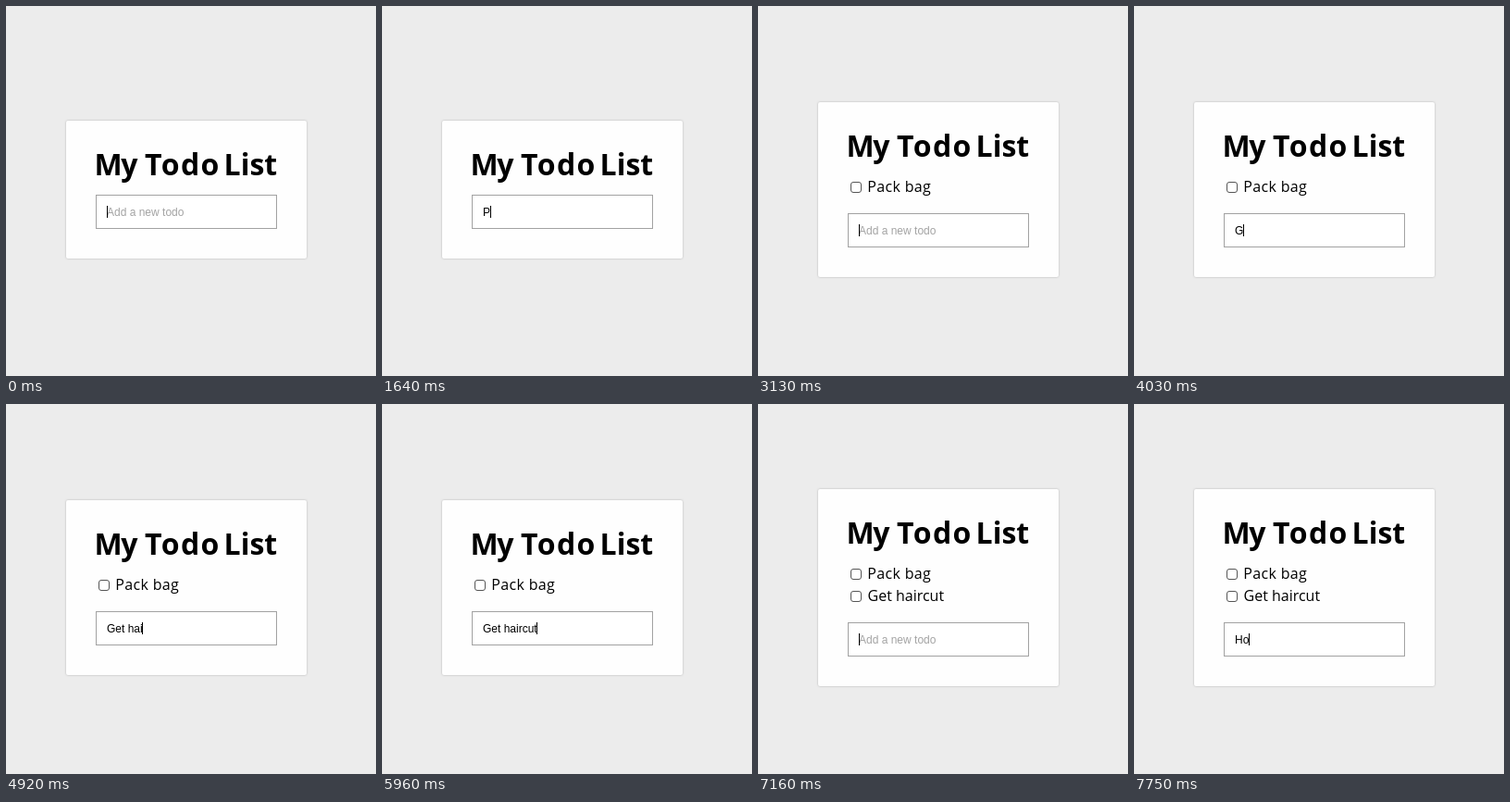
Write an HTML page that moves like this. It is 400 by 400 pixels and loops after 8 s.

```html
<!DOCTYPE html>
<html lang="en">
<head>
<meta charset="utf-8">
<title>My Todo List</title>
<style>
  html, body { margin: 0; width: 100%; height: 100%; overflow: hidden; background: #ececec; }
  svg { display: block; width: 100vw; height: 100vh; }
  .card { fill: #fefefe; filter: drop-shadow(0 0 1px rgba(0, 0, 0, .24)); }
  .title { font: 700 32px "Open Sans", sans-serif; }
  .item text { font: 400 16px "Open Sans", sans-serif; }
  .box { fill: #fff; stroke: #555; }
  .field { fill: #fff; stroke: #a2a2a2; }
  .entry { font: 12px "Liberation Sans", Arial, sans-serif; }
</style>
</head>
<body>
<svg viewBox="0 0 400 400">
  <rect class="card" id="card" x="65" width="260" rx="2"/>
  <g id="heading" class="title">
    <text x="95.6" y="59" letter-spacing="-1.4">My</text>
    <text x="150" y="59" letter-spacing="1.4">Todo</text>
    <text x="235.6" y="59">List</text>
  </g>
  <g class="item">
    <rect class="box" x="100.5" y="-5.5" width="11" height="11" rx="2.5"/>
    <text x="118.2" y="5" letter-spacing=".35">Pack bag</text>
  </g>
  <g class="item">
    <rect class="box" x="100.5" y="-5.5" width="11" height="11" rx="2.5"/>
    <text x="118.6" y="5">Get haircut</text>
  </g>
  <g id="input">
    <rect class="field" x="97.5" y=".5" width="195" height="36"/>
    <text class="entry" id="entry" x="109" y="23"></text>
    <rect id="caret" y="12" width="1" height="13"/>
  </g>
</svg>
<script>
const LOOP = 8000;
const HINT = "Add a new todo";
const START = 109;

// [time, finished items, typed text, caret x (0 = hidden)]
const steps = [
  [0, 0, "", START], [300, 0, "", 0], [740, 0, "", START], [1340, 0, "", 0],
  [1640, 0, "P", 117], [1790, 0, "Pa", 124], [1940, 0, "Pac", 130], [2090, 0, "Pack ", 139],
  [2390, 0, "Pack b", 146], [2690, 0, "Pack ba", 152], [2840, 0, "Pack bag", 159],
  [3130, 1, "", START], [3730, 1, "", 0],
  [4030, 1, "G", 118], [4330, 1, "Ge", 125], [4480, 1, "Get ", 131],
  [4770, 1, "Get h", 138], [4920, 1, "Get hai", 147], [5370, 1, "Get hai", 0],
  [5520, 1, "Get hair", 151], [5670, 1, "Get hairc", 157],
  [5820, 1, "Get haircu", 164], [5960, 1, "Get haircut", 167],
  [6110, 2, "", START], [6710, 2, "", 0], [7160, 2, "", START],
  [7610, 2, "H", 118], [7750, 2, "Ho", 124]
];
const cardTops = [124, 104, 92];

const $ = id => document.getElementById(id);
const [card, heading, input, entry, caret] = ["card", "heading", "input", "entry", "caret"].map($);
const items = [...document.querySelectorAll(".item")];
const moveTo = (el, y) => el.setAttribute("transform", `translate(0 ${y})`);

function show([, count, text, caretX]) {
  const top = cardTops[count];
  const height = 397 - 2 * top;
  card.setAttribute("y", top);
  card.setAttribute("height", height);
  moveTo(heading, top);
  moveTo(input, top + height - 69);
  items.forEach((item, i) => {
    item.style.display = i < count ? "" : "none";
    moveTo(item, top + 92 + 24 * i);
  });
  entry.textContent = text || HINT;
  entry.style.fill = text ? "#000" : "#a3a3a3";
  caret.style.display = caretX ? "" : "none";
  caret.setAttribute("x", caretX);
}

let current;
const origin = performance.now();
function tick() {
  const time = (performance.now() - origin) % LOOP;
  const step = steps.findLast(s => s[0] <= time);
  if (step !== current) show(current = step);
  requestAnimationFrame(tick);
}
tick();
</script>
</body>
</html>
```
